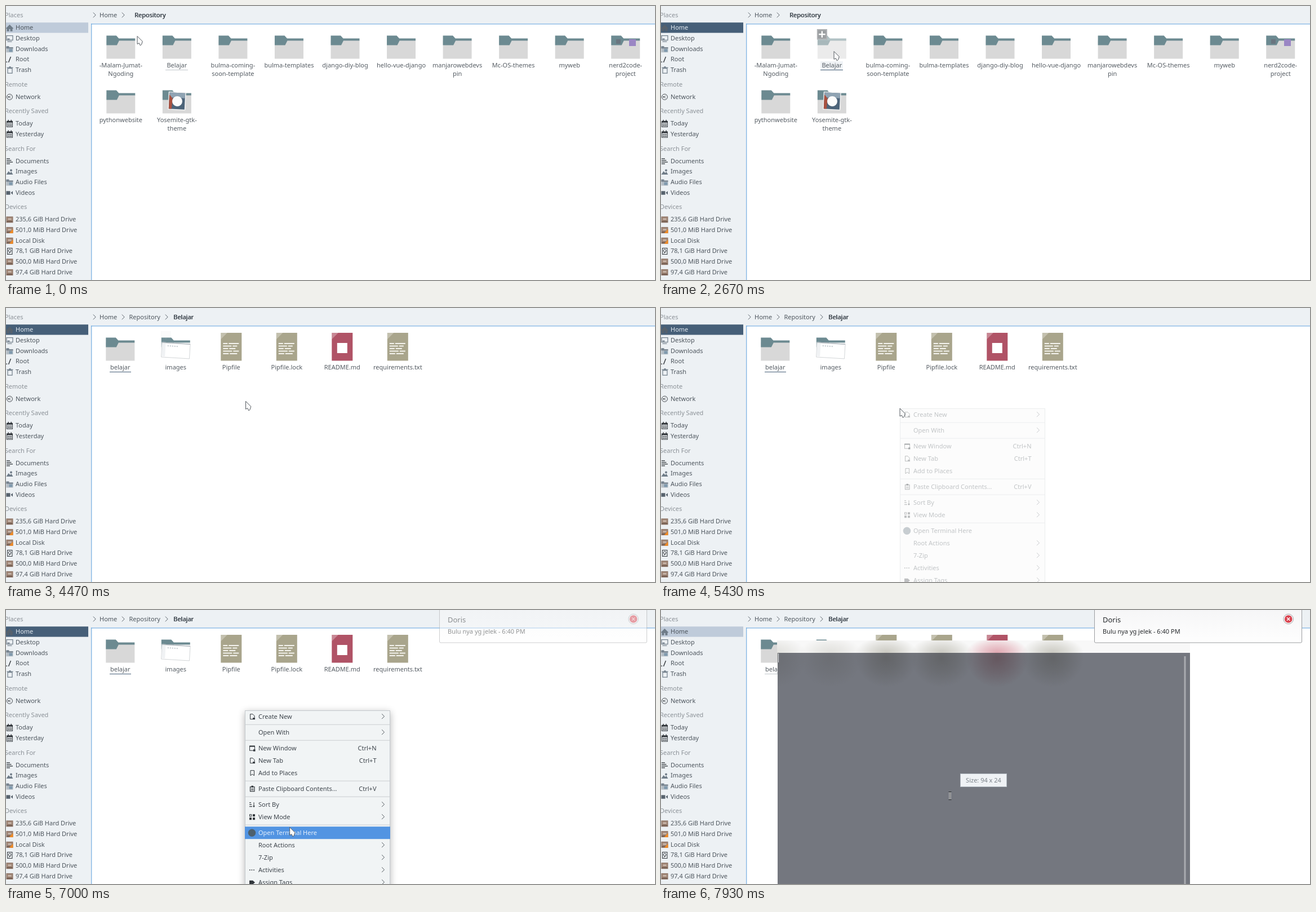
An HTML page with a canvas for the animation above (8000 ms loop, 1152 by 486 pixels).

```html
<!DOCTYPE html>
<html lang="en">
<head>
<meta charset="utf-8">
<title>File manager</title>
<style>
html, body { margin: 0; width: 100%; height: 100%; overflow: hidden; background: #fff; }
canvas { display: block; width: 1152px; height: 486px; }
</style>
</head>
<body>
<canvas id="stage" width="1152" height="486"></canvas>
<script>
const g = document.getElementById('stage').getContext('2d');
const LOOP = 8000;
const INK = '#4d555d', BLACK = '#31363b', GRAY = '#6f7c88', PANEL = '#edf1f4';
const TEAL = '#6c8a91', BLUE = '#5294e2', NAVY = '#465f78';

// ---- drawing helpers ----
function box(x, y, w, h, color) {
  g.fillStyle = color;
  g.fillRect(x, y, w, h);
}
function frame(x, y, w, h, color, lw = 1) {
  g.strokeStyle = color;
  g.lineWidth = lw;
  g.strokeRect(x, y, w, h);
}
function trace(pts) {
  g.beginPath();
  for (let i = 0; i < pts.length; i += 2) g.lineTo(pts[i], pts[i + 1]);
}
function poly(color, ...pts) {
  trace(pts);
  g.fillStyle = color;
  g.fill();
}
function line(color, lw, ...pts) {
  trace(pts);
  g.strokeStyle = color;
  g.lineWidth = lw;
  g.stroke();
}
function dot(x, y, r, color) {
  g.beginPath();
  g.arc(x, y, r, 0, 7);
  g.fillStyle = color;
  g.fill();
}
function ring(x, y, r, color, lw = 1) {
  g.beginPath();
  g.arc(x, y, r, 0, 7);
  g.strokeStyle = color;
  g.lineWidth = lw;
  g.stroke();
}
function text(s, x, cy, color = INK, align = 'left', size = 11) {
  g.font = size + 'px "Noto Sans", sans-serif';
  g.textAlign = align;
  g.fillStyle = color;
  g.fillText(s, x, Math.round(cy + size * 0.36));
}
function boldText(s, x, cy) {
  text(s, x, cy, '#3c444c');
  text(s, x + 0.5, cy, '#3c444c');
}
function chevron(x, y, color) {
  line(color, 0.9, x - 2.2, y - 4.4, x + 2.2, y, x - 2.2, y + 4.4);
}
function at(x, y, draw, ...args) {
  g.save();
  g.translate(x, y);
  draw(...args);
  g.restore();
}

// ---- timing ----
const ramp = (t, a, b) => Math.max(0, Math.min(1, (t - a) / (b - a)));

// start and end of each move, and where it leads
const START = [232.5, 53], LEAD = 40;
const moves = [
  [430, 730, 371, 155], [1330, 1430, 304, 93], [1870, 2190, 387, 106], [2190, 2530, 306.5, 80],
  [3870, 4130, 331, 136], [4270, 4530, 448, 172], [4530, 4800, 414, 170], [4970, 5070, 423.5, 177.5],
  [5770, 5900, 490, 241], [6100, 6230, 503.5, 305], [6530, 6530, 505, 375], [6670, 6800, 503, 390],
  [7000, 7130, 503.5, 368.5]
];
function pointer(t) {
  let [x, y] = START;
  for (const [a, b, toX, toY] of moves) {
    if (t < a) break;
    const u = ramp(t, a - LEAD, b);
    x += (toX - x) * u;
    y += (toY - y) * u;
  }
  return [x, y];
}

// ---- sidebar ----
const icons = {
  home(c) {
    poly(c, -7, 1, 0, -6, 7, 1);
    box(-5, 0, 4, 6, c);
    box(1, 0, 4, 6, c);
    box(-5, 0, 10, 2, c);
  },
  desktop() {
    frame(-5.5, -5, 11, 8, GRAY, 1.2);
    box(-4, 5, 8, 1.2, GRAY);
    box(-4, 0, 4, 2, GRAY);
  },
  folder() {
    box(-6, -5, 5, 3, GRAY);
    box(-6, -3, 12, 9, '#b3bcc4');
    box(-6, -3, 12, 2, GRAY);
    box(-1, 0, 6, 5, '#7f99ad');
  },
  root() {
    line(BLACK, 1.4, -2, 5, 2, -5);
    box(-6, 3.5, 1.6, 1.6, BLACK);
  },
  trash() {
    frame(-3.5, -3, 8, 8.5, GRAY, 1.2);
    box(-5, -5, 11, 1.2, GRAY);
    box(-1, -6.5, 3, 2, GRAY);
  },
  network() {
    ring(0, 0, 5, BLACK, 0.9);
    line(BLACK, 0.7, 2, -2, -2, 0, 2, 2);
    dot(-2, 0, 1.1, BLACK);
  },
  calendar() {
    frame(-5, -4.5, 10, 10, BLACK);
    box(-5, -5, 10, 3, BLACK);
    box(-3, -7, 1.5, 2, BLACK);
    box(2, -7, 1.5, 2, BLACK);
    for (let i = 0; i < 6; i++) box(-3.4 + i % 3 * 2.6, -0.5 + (i > 2) * 2.8, 1.7, 1.8, BLACK);
  },
  docs() {
    for (let i = 0; i < 4; i++) box(-5.5, -5 + i * 3, 6 + i % 3 * 2.5, 1.3, BLACK);
  },
  images() {
    poly(GRAY, -6, 5, -2, -1, 1, 2, 3, 0, 6, 5);
    dot(2.5, -2.5, 2, GRAY);
  },
  video() {
    box(-6, -3, 7, 6.5, '#56616c');
    poly('#56616c', 2, 0, 5.5, -3, 5.5, 3.5);
  },
  drive(mounted) {
    box(-6, -5.5, 12, 11, '#8b7163');
    box(-5, -4.5, 10, 8, '#a08676');
    box(-3, -2, 6, 2, '#d3c4b9');
    box(-5, 2.5, 10, 1.5, '#6c574c');
    if (mounted) poly('#ef8a24', -1, 5.5, 6, -2, 6, 5.5);
  },
  disk() {
    frame(-4, -5.5, 8.5, 11, BLACK);
    ring(0.2, -1, 2.4, BLACK);
    line(BLACK, 1, -2, 4, 2, 1);
  }
};
// section title, then "label:icon"
const sections = [
  ['Places', 'Home:home', 'Desktop:desktop', 'Downloads:folder', 'Root:root', 'Trash:trash'],
  ['Remote', 'Network:network'],
  ['Recently Saved', 'Today:calendar', 'Yesterday:calendar'],
  ['Search For', 'Documents:docs', 'Images:images', 'Audio Files:folder', 'Videos:video'],
  ['Devices', '235,6 GiB Hard Drive:drive', '501,0 MiB Hard Drive:drive:on', 'Local Disk:drive:on',
    '78,1 GiB Hard Drive:disk', '500,0 MiB Hard Drive:drive', '97,4 GiB Hard Drive:drive']
];
function sidebar(active) {
  box(0, 0, 1152, 486, PANEL);
  box(0, 29.3, 146, 18.3, active ? NAVY : '#bfcbda');
  let y = 16.4;
  for (const [title, ...items] of sections) {
    text(title, -2, y, '#8b9197');
    y += 22;
    for (const item of items) {
      const [name, icon, on] = item.split(':');
      const lit = icon === 'home' && active;
      at(6.5, y + 0.5, icons[icon], icon === 'home' ? (lit ? '#56616c' : GRAY) : on);
      text(name, 17, y, lit ? '#e4ebf1' : INK);
      y += 18.7;
    }
    y += 6.9;
  }
}

// ---- file view ----
function folder(body = true) {
  if (body) box(-25.5, 61, 51, 32.5, '#d8d8d8');
  poly(TEAL, -25.5, 52.5, -8, 52.5, -3.5, 57.5, 25.5, 57.5, 25.5, 61.5, -3, 61.5, -7, 69.5, -25.5, 69.5);
}
function badge(a) {
  g.globalAlpha = a;
  box(-26.5, 41, 18, 18.5, '#9c9fa2');
  frame(-25.5, 42, 16, 16.5, '#bfc1c3');
  box(-18.7, 44.5, 2.4, 11.5, '#fff');
  box(-23.2, 49, 11.5, 2.4, '#fff');
}
function picture() {
  g.rotate(0.05);
  box(-15.5, -16, 31, 32, '#f4f4f4');
  box(-14, -14.5, 28, 29, '#4c6379');
  box(-14, -14.5, 28, 9, '#8fa3b3');
  poly('#a9503f', -14, -11, -8, -4, -9, 14.5, -14, 14.5);
  dot(0.5, 0.5, 9, '#fbfbfb');
}
function screenshot() {
  g.rotate(0.06);
  box(-25.5, -14, 51, 27, '#fff');
  frame(-25, -13.5, 50, 26, '#c9cccf', 0.8);
  box(-25, -14, 50, 1.5, '#b4bbc0');
  box(-24.5, -12, 6, 23, '#f0f2f4');
  for (let i = 0; i < 5; i++) box(-15 + i * 4, -9, 2, 2, '#c3cacf');
}
function paper(color) {
  box(-18.5, 44, 37, 49.5, color);
  poly('rgba(255,255,255,.3)', -18.5, 44, -7, 44, -18.5, 55.5);
}
function textFile() {
  paper('#a9a58c');
  for (let i = 0; i < 5; i++) {
    const gap = 8 + i * 7 % 13;
    box(-14.5, 62 + i * 4.5, gap, 2, '#f4f3ee');
    box(-12.5 + gap, 62 + i * 4.5, 26 - gap - i % 3 * 3, 2, '#f4f3ee');
  }
}
function label(lines, x, y = 105) {
  lines.split('|').forEach((s, i) => text(s, x, y + i * 15, '#555c63', 'center'));
}
const repos = ['-Malam-Jumat-|Ngoding', 'Belajar', 'bulma-coming-|soon-template', 'bulma-templates',
  'django-diy-blog', 'hello-vue-django', 'manjarowebdevs|pin', 'Mc-OS-themes', 'myweb',
  'nerd2code-|project', 'pythonwebsite', 'Yosemite-gtk-|theme'];
const files = ['belajar', 'images', 'Pipfile', 'Pipfile.lock', 'README.md', 'requirements.txt'];

function fadedFolder(x, hover, body) {
  g.save();
  g.globalAlpha = 1 - hover * 0.48;
  at(x, 0, folder, body);
  g.restore();
}
function underline(x, w, active) {
  box(x, 113, w, 1, active ? NAVY : '#c3c8cd');
}
function repoView(t, active) {
  const hover = ramp(t, 1280, 1430) - ramp(t, 1900, 2090) + ramp(t, 2260, 2420);
  repos.forEach((name, i) => {
    const x = 203.8 + i % 10 * 99.55, dy = i > 9 ? 97 : 0;
    if (name === 'Belajar') {
      fadedFolder(x, hover);
      box(283, 98, 40, 15, `rgba(225,232,238,${hover * 0.5})`);
      at(x, 0, badge, hover);
    } else at(x, dy, folder);
    label(name, x, 105 + dy);
  });
  underline(283, 40, active);
  box(1083, 59, 8, 8, '#6a7580');
  box(1106, 59, 12, 12, '#9a86c4');
  at(303.5, 168.5, picture);
}
function filesView(t, active) {
  const hover = ramp(t, 3760, 4130) - ramp(t, 4270, 4480), preview = t >= 4000;
  files.forEach((name, i) => {
    const x = 202.8 + i * 98.5;
    if (name === 'belajar') at(x, 0, folder);
    else if (name === 'images') {
      fadedFolder(x, hover, !preview);
      if (preview) at(x, 76, screenshot);
      at(x, 0, badge, hover);
    } else if (name === 'README.md') {
      at(x, 0, paper, '#b05366');
      box(x - 9, 62, 18, 18, '#fff');
    } else at(x, 0, textFile);
    label(name, x);
  });
  underline(184, 38, active);
}
function crumbs(inside) {
  chevron(157, 16, INK);
  text('Home', 166, 16.5);
  chevron(208, 16, INK);
  if (inside) {
    text('Repository', 218.5, 16.5);
    chevron(285, 16, INK);
    boldText('Belajar', 297, 16.5);
  } else boldText('Repository', 228, 16.5);
}

// ---- context menu ----
const menuIcons = {
  doc(c) {
    line(c, 1, 1, 4.5, -3.5, 4.5, -3.5, -4.5, 1, -4.5, 4, -1.5, 4, 2);
    box(1, 2, 4, 3, c);
  },
  win(c) {
    frame(-4.5, -4, 9, 8, c);
    box(-4.5, -4.5, 9, 2, c);
    box(2, 2, 3.5, 3.5, c);
  },
  mark(c) { line(c, 1, -3, 4.5, -3, -4.5, 3.5, -4.5, 3.5, 4.5, 0.2, 2, -3, 4.5); },
  clip(c) {
    frame(-3.5, -3.5, 7.5, 8, c, 1.2);
    box(-1.5, -5.5, 3.5, 3, c);
    box(-2, -0.5, 4.5, 1, c);
    box(-2, 1.5, 4.5, 1, c);
  },
  sort(c) {
    for (let i = 0; i < 3; i++) box(-5, -4 + i * 3.4, 3 + i, 1.2, c);
    line(c, 1, 3, -4, 3, 4);
    poly(c, 1, 2, 5, 2, 3, 5);
  },
  grid(c) {
    frame(-4.5, -4.5, 3.2, 3.2, c);
    box(1, -5, 4, 4, c);
    box(-5, 1, 4, 4, c);
    box(1, 1, 4, 4, c);
  },
  term() { dot(-0.5, 0, 6.7, '#4d606d'); },
  dots(c) { for (let i = -1; i < 2; i++) box(i * 3.6 - 1.4, -0.8, 1.6, 1.6, c); },
  tag(c) { poly(c, -5, -3.5, 1, -3.5, 5, 0, 1, 3.5, -5, 3.5); }
};
// groups of "label:icon:end"
const menu = [
  ['Create New:doc:>'],
  ['Open With::>'],
  ['New Window:win:Ctrl+N', 'New Tab:doc:Ctrl+T', 'Add to Places:mark:'],
  ['Paste Clipboard Contents...:clip:Ctrl+V'],
  ['Sort By:sort:>', 'View Mode:grid:>'],
  ['Open Terminal Here:term:', 'Root Actions::>', '7-Zip::>', 'Activities:dots:>', 'Assign Tags:tag:>']
];
function menuRow(item, y, on) {
  const [name, icon, end] = item.split(':');
  const c = on ? '#e6f0fc' : '#3d444b';
  if (on) box(424, y - 11, 258, 22, BLUE);
  if (icon) at(437, y, menuIcons[icon], on ? '#26384f' : BLACK);
  text(name, 448, y, c);
  if (end === '>') chevron(669.3, y - 0.5, c);
  else text(end, 657.5, y, c, 'right');
}
function contextMenu(t, py) {
  if (t < 5430 || t >= 7700) return;
  const a = t < 5570 ? 0.3 : 1 - ramp(t, 7130, 7520);
  g.save();
  g.globalAlpha = a;
  if (a === 1) {
    g.shadowColor = 'rgba(0,0,0,.3)';
    g.shadowBlur = 12;
    g.shadowOffsetY = 3;
  }
  box(424, 178, 258, 330, a < 1 ? '#f6f6f6' : '#f1f4f5');
  g.shadowColor = 'transparent';
  frame(424.5, 178.5, 257, 330, '#c4c9cd');
  const focus = t < 5770 ? 0 : t < 6800 ? py + 2 : 395;
  let y = 189.2;
  for (const group of menu) {
    for (const item of group) {
      menuRow(item, y, Math.abs(focus - y) <= 11);
      y += 22;
    }
    box(425, y - 8.5, 256, 1, '#c9cdd0');
    y += 6;
  }
  g.restore();
}

// ---- overlays ----
function arrow() {
  g.beginPath();
  g.moveTo(0.5, 0.5);
  for (const [x, y] of [[0.5, 14.5], [3.8, 12.8], [5.8, 17], [8, 15.5], [9.8, 9.8]]) g.lineTo(x, y);
  g.closePath();
  g.fillStyle = '#fafafa';
  g.fill();
  g.strokeStyle = '#555b61';
  g.lineWidth = 1;
  g.stroke();
}
function launcher(t) {
  g.scale(1, 1 + 0.25 * Math.cos((t - 7700) / 75));
  dot(0, 0, 6, '#4b5f69');
}
function notice(t) {
  g.save();
  g.globalAlpha = t < 7130 ? 0.5 : 1;
  const fill = g.createLinearGradient(0, 0, 0, 58);
  fill.addColorStop(0, '#f6f6f7');
  fill.addColorStop(1, '#fefefe');
  g.beginPath();
  g.roundRect(769.5, -4, 368, 62, 2);
  g.fillStyle = fill;
  g.fill();
  g.strokeStyle = '#9b9da0';
  g.lineWidth = 1;
  g.stroke();
  text('Doris', 784, 17, '#26292c', 'left', 13);
  text('Bulu nya yg jelek - 6:40 PM', 784, 38, '#26292c');
  ring(1113.7, 16, 8.8, '#a5a8aa');
  dot(1113.7, 16, 6.8, '#d9434f');
  line('#fff', 1.4, 1111, 13.3, 1116.4, 18.7);
  line('#fff', 1.4, 1116.4, 13.3, 1111, 18.7);
  g.restore();
}
function smudge(rx, ry, rgb, a) {
  g.scale(rx, ry);
  const f = g.createRadialGradient(0, 0, 0, 0, 0, 1);
  f.addColorStop(0, `rgba(${rgb},${a})`);
  f.addColorStop(0.5, `rgba(${rgb},${a * 0.55})`);
  f.addColorStop(1, `rgba(${rgb},0)`);
  box(-1, -1, 2, 2, f);
}
function blurredFiles(y, ry, alpha, plain, red) {
  files.forEach((name, i) => {
    at(202.8 + i * 98.5, y, smudge, 55, ry, name === 'README.md' ? red : plain, i < 2 ? alpha / 2 : alpha);
  });
}
function terminal() {
  g.save();
  g.beginPath();
  g.rect(206, 54, 733, 432);
  g.clip();
  box(206, 54, 733, 22, '#f8f8f8');
  blurredFiles(76, 28, 0.55, '165,163,148', '205,100,118');
  box(207, 76, 732, 410, '#74777f');
  g.beginPath();
  g.rect(207, 76, 732, 410);
  g.clip();
  blurredFiles(85, 52, 0.7, '92,93,94', '96,74,82');
  box(208, 77, 1, 16, '#e3e5e7');
  box(928.5, 82, 3, 404, '#a9abb0');
  g.restore();
  box(531, 290, 83, 24, '#eff2f5');
  frame(531.5, 290.5, 82, 23, '#b4bcc4');
  text('Size: 94 x 24', 572.5, 302.5, '#7b8289', 'center');
  line('#e4e4e4', 3, 513, 323, 513, 336);
  line('#25282b', 1, 513, 322.5, 513, 336.5);
  for (const y of [322.5, 336.5]) line('#25282b', 1, 510.5, y, 515.5, y);
}

function draw(t) {
  const inside = t >= 3730, open = t >= 7930, active = t >= 2670 && !open;
  const [px, py] = pointer(t);
  sidebar(active);
  box(151, 31, 1001, 455, '#fff');
  box(151, 31.4, 1001, 1.1, '#67a5dd');
  box(151.2, 31.4, 1.1, 455, '#67a5dd');
  crumbs(inside);
  if (inside) filesView(t, active);
  else repoView(t, active);
  contextMenu(t, py);
  if (open) terminal();
  else {
    if (t >= 7270) at(525, 400.5, launcher, t);
    at(px, py, arrow);
  }
  if (t >= 7000) notice(t);
}
function tick() {
  draw(performance.now() % LOOP);
  requestAnimationFrame(tick);
}
tick();
</script>
</body>
</html>
```
